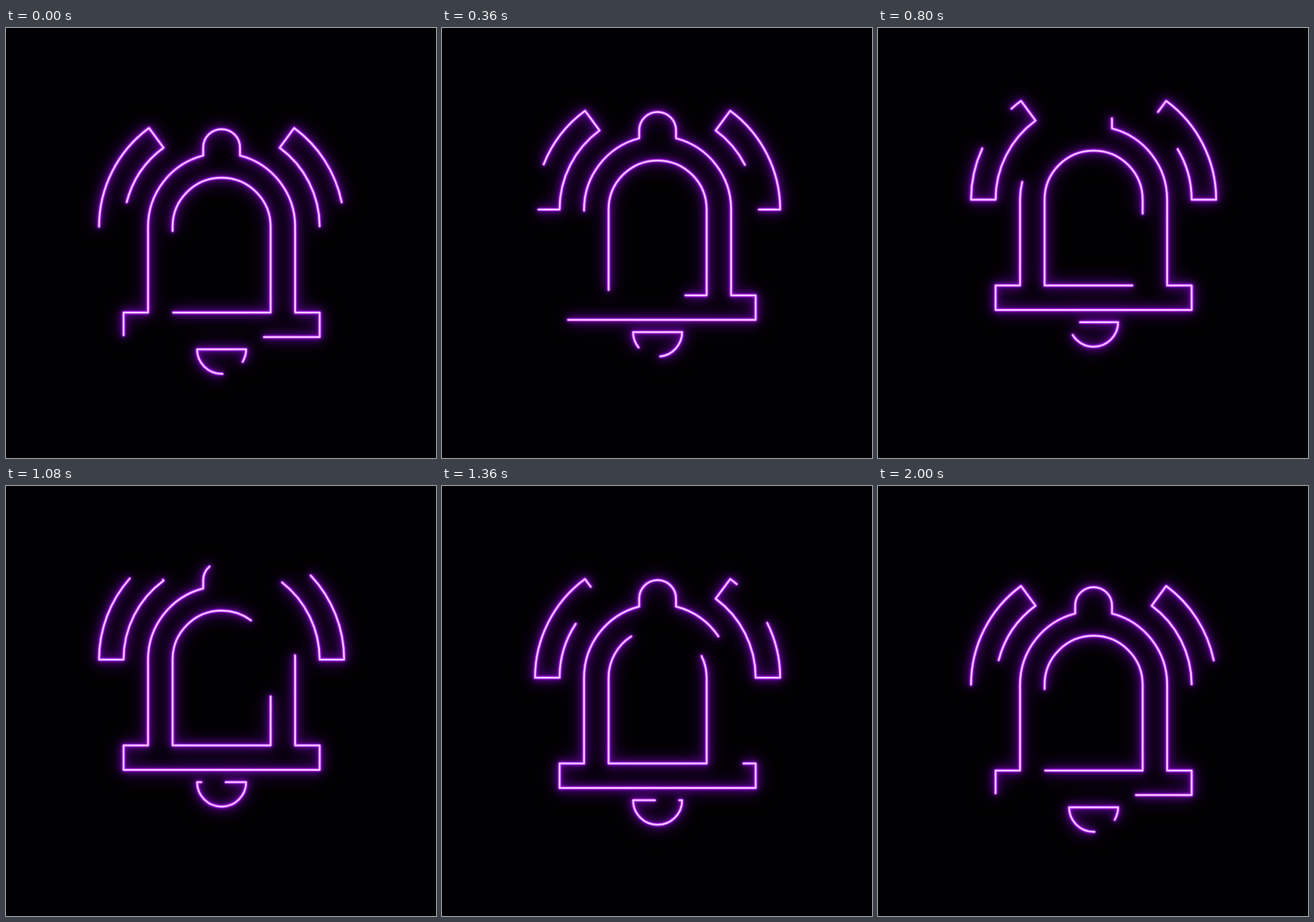
An HTML page for the animation above (2.04 s loop, 500x500 px).

```html
<!DOCTYPE html>
<html lang="en">
<head>
<meta charset="utf-8">
<title>Neon bell</title>
<style>
  html, body { margin: 0; width: 100%; height: 100%; overflow: hidden; background: #010002; }
  svg { display: block; width: 500px; height: 500px; }
  path { fill: none; stroke-linecap: round; stroke-linejoin: round; }
  #glow { filter: drop-shadow(0 0 1.6px #a010f0) drop-shadow(0 0 5px #7404b8) drop-shadow(0 0 10px #480072); }
  #edge { stroke: #c234ff; stroke-width: 3.3; }
  #core { stroke: #fad4ff; stroke-width: 1.7; }
</style>
</head>
<body>
<svg viewBox="0 0 500 500">
  <g id="glow"><g id="edge"></g></g>
  <g id="core"></g>
</svg>
<script>
const LOOP = 2040, STEP = 40, TURN = 2000;
const GAP = 0.194, LIFT = 32.3;
const CX = 250.7, CY = 231.1;

// Each outline runs in the direction its gap travels; phase is where the gap begins.
const outlines = [
  { phase: 0.076, d: `M114 128.25H-114V99.75H-85.5V0A85.5 85.5 0 0 1 -21.4 -82.8V-92.1
      A21.4 21.4 0 0 1 21.4 -92.1V-82.8A85.5 85.5 0 0 1 85.5 0V99.75H114Z` },
  { phase: 0.010, d: 'M-57 0V99.75H57V0A57 57 0 0 0 -57 0Z' },
  { phase: 0.104, d: 'M28.5 142.5A28.5 28.5 0 0 1 -28.5 142.5Z' },
  { phase: 0.262, d: 'M-67.5 -91.9A114 114 0 0 0 -114 0H-142.5A142.5 142.5 0 0 1 -84.4 -114.8Z' },
  { phase: 0.3525, d: 'M84.4 -114.8A142.5 142.5 0 0 1 142.5 0H114A114 114 0 0 0 67.5 -91.9Z' }
];

const layers = ['edge', 'core'].map(id => document.getElementById(id));
for (const o of outlines) {
  o.paths = layers.map(layer => {
    const p = document.createElementNS('http://www.w3.org/2000/svg', 'path');
    p.setAttribute('d', o.d);
    p.setAttribute('pathLength', 1000);
    p.setAttribute('stroke-dasharray', `${1000 * (1 - GAP)} ${1000 * GAP}`);
    return layer.appendChild(p);
  });
}

// cubic-bezier(.25, .1, .25, 1)
function ease(x) {
  if (x <= 0) return 0;
  if (x >= 1) return 1;
  let lo = 0, hi = 1, s;
  for (let i = 0; i < 24; i++) {
    s = (lo + hi) / 2;
    if (0.75 * s * (1 - s) + s ** 3 < x) lo = s; else hi = s;
  }
  return 0.3 * s * (1 - s) ** 2 + 3 * s * s * (1 - s) + s ** 3;
}

function draw(now) {
  const t = Math.floor(now % LOOP / STEP) * STEP % TURN;
  const rise = t < 1000 ? ease(t / 1000) : 1 - ease((t - 1000) / 800);
  for (const layer of layers)
    layer.setAttribute('transform', `translate(${CX} ${CY - LIFT * rise})`);
  for (const o of outlines) {
    const start = (o.phase + t / TURN + GAP) % 1;
    for (const p of o.paths) p.setAttribute('stroke-dashoffset', 1000 * (1 - start));
  }
}

const t0 = performance.now();
function tick() {
  draw(performance.now() - t0);
  requestAnimationFrame(tick);
}
tick();
</script>
</body>
</html>
```
